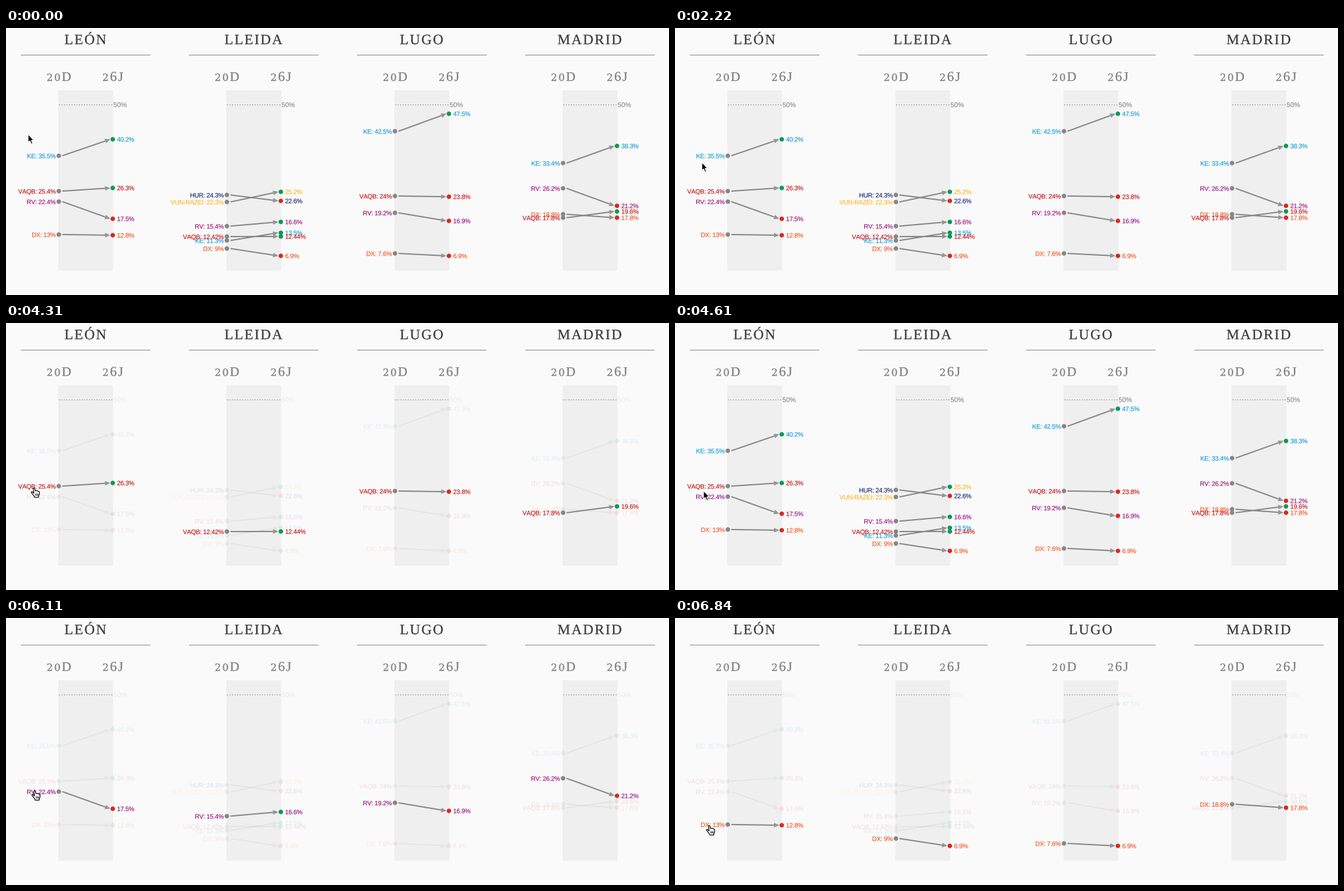
These frames come from a looping animation (1065x429 px, 8 s). A matplotlib script:

```python
import numpy as np
import matplotlib.pyplot as plt
from matplotlib.animation import FuncAnimation
from matplotlib.patches import Circle, PathPatch, Polygon, Rectangle
from matplotlib.path import Path
from matplotlib.textpath import TextPath

W, H, DPI = 1065, 429, 64
LOOP, INTERVAL = 8000, 40
PX = 72 / DPI  # one pixel in points

SANS, SERIF, WIDE = "Liberation Sans", "Liberation Serif", "DejaVu Serif"
GRAY, HEAD, GAIN, LOSS = "#868686", "#949494", "#0a9b52", "#d82a20"
COLORS = {"KE": "#0a9bdb", "VAQB": "#c60c0c", "RV": "#980a78",
          "DX": "#f1521b", "HUR": "#10206a", "VUN-RAZEI": "#fdb71e"}
PROVINCES = {
    "LEÓN": [("KE", 35.5, 40.2), ("VAQB", 25.4, 26.3),
             ("RV", 22.4, 17.5), ("DX", 13, 12.8)],
    "LLEIDA": [("VUN-RAZEI", 22.3, 25.2), ("HUR", 24.3, 22.6),
               ("RV", 15.4, 16.6), ("KE", 11.3, 13.5),
               ("VAQB", 12.42, 12.44), ("DX", 9, 6.9)],
    "LUGO": [("KE", 42.5, 47.5), ("VAQB", 24, 23.8),
             ("RV", 19.2, 16.9), ("DX", 7.6, 6.9)],
    "MADRID": [("KE", 33.4, 38.3), ("RV", 26.2, 21.2),
               ("DX", 18.8, 17.8), ("VAQB", 17.8, 19.6)],
}

# Pointer moves: start and end in ms, resting place
HOME = (35, 170)
MOVES = [(140, 880, (42, 203)), (1930, 2960, (45, 264.5)),
         (4310, 5060, (46, 277)), (6110, 6840, (55, 333))]
TICK = 147         # ms between screen refreshes while the pointer moves
REACH = 6          # px around a row in which it reacts
FADE_STEP = 0.6    # share of the fade done per refresh
FAINT = 0.1

ARROW = np.array([(0.5, 0.5), (0.5, 14), (3.4, 11.3), (5.7, 16.6), (8, 15.6),
                  (5.8, 10.5), (9.8, 10.5)])
HAND = np.array([(-1.4, 1.2), (-0.2, 0.3), (1, 1.1), (2, 5.2), (4.2, 4.8),
                 (6.4, 5.5), (8.4, 6.6), (8.8, 10), (7.6, 13), (7.3, 15.6),
                 (0.8, 15.6), (0, 13.4), (-4.5, 7.7), (-4, 6.7), (-2.6, 6.8),
                 (-0.2, 9)])

fig = plt.figure(figsize=(W / DPI, H / DPI), dpi=DPI, facecolor="#fafafa")
ax = fig.add_axes([0, 0, 1, 1])
ax.set(xlim=(0, W), ylim=(H, 0))
ax.axis("off")


def add(patch):
    patch.set_zorder(2)
    return ax.add_patch(patch)


def stroke(p, q, color, width, **style):
    return add(PathPatch(Path([p, q]), fc="none", ec=color, lw=width * PX,
                         capstyle="butt", snap=False, **style))


def dot(x, y, color):
    return add(Circle((x, y), 3.6, fc=color, ec="none"))


advances = {}


def advance(char, family):
    """Advance width of a glyph at size 1."""
    key = char, family
    if key not in advances:
        def width(s):
            return TextPath((0, 0), s, 100, prop={"family": family}).get_extents().width
        advances[key] = (width("H" + char + "H") - width("HH")) / 100
    return advances[key]


def text(x, y, glyphs, color, spacing=0, anchor=0.0, weight=0.1):
    """Draw (char, family, size) glyphs on baseline y; anchor 0 left, 1 right."""
    verts, codes, pen = [], [], 0
    for char, family, size in glyphs:
        if char != " ":
            path = TextPath((pen, 0), char, size, prop={"family": family})
            verts.append(path.vertices)
            codes.append(path.codes)
        pen += advance(char, family) * size + spacing
    verts = np.concatenate(verts) * (1, -1) + (x - (pen - spacing) * anchor, y)
    return add(PathPatch(Path(verts, np.concatenate(codes)), fc=color, ec=color,
                         lw=weight * PX, snap=False))


def plain(s, family, size):
    return [(c, family, size) for c in s]


def label(x, y, s, color, anchor=0):
    return text(x, y + 3.7, plain(s, SANS, 10.2), color, -0.25, anchor)


def level_y(v):
    return 123.7 + (50 - v) * 5.625


def slope(x, party, before, after):
    """One party's change between both votes, as a list of artists."""
    color = COLORS[party]
    y0, y1 = level_y(before), level_y(after)
    start, tip = np.array([x + 90.5, y0]), np.array([x + 167.5, y1])
    along = (tip - start) / np.hypot(*(tip - start))
    across = np.array([-along[1], along[0]]) * 3.7
    base = tip - along * 8.5
    return [
        stroke(start, base, GRAY, 2),
        add(Polygon([tip, base + across, base - across], fc=HEAD, ec="none")),
        dot(x + 84.8, y0, GRAY),
        dot(x + 171.5, y1, GAIN if after > before else LOSS),
        label(x + 80, y0 + 0.3, f"{party}: {before:g}%", color, 1),
        label(x + 178.3, y1, f"{after:g}%", color),
    ]


OLD_2, OLD_0 = ("2", WIDE, 16), ("0", WIDE, 16)
DATES = [(85, [OLD_2, OLD_0, ("D", SERIF, 21)]),
         (171.5, [OLD_2, ("6", SERIF, 22), ("J", SERIF, 21)])]

slopes, halves = [], []
for i, (province, results) in enumerate(PROVINCES.items()):
    x = 270 * i
    text(x + 127.5, 26, plain(province, SERIF, 23), "#3c3c3c", 2, 0.5, 0.3)
    stroke((x + 24, 43.5), (x + 232, 43.5), "#888888", 1)
    for cx, glyphs in DATES:
        text(x + cx, 85, glyphs, "#808080", 2, 0.5, 0.3)
    add(Rectangle((x + 84, 100), 88, 290, fc="#efefef", ec="none"))
    stroke((x + 85, 123.5), (x + 172, 123.5), "#999999", 1, ls=(0, (2, 2)))
    halves.append(text(x + 172.5, 127, plain("50%", SANS, 10.8), "#888888"))
    for party, before, after in results:
        slopes.append((party, slope(x, party, before, after)))

arrow = add(Polygon(ARROW, fc="black", ec="white", lw=1.2 * PX))
hand = add(Polygon(HAND, fc="white", ec="black", lw=1.2 * PX, joinstyle="round"))
knuckles = [stroke((0, 0), (0, 1), "black", 0.9) for _ in range(3)]


def pointer(t):
    """Pointer position, easing from rest to rest."""
    pos = np.array(HOME, float)
    for start, end, goal in MOVES:
        u = np.clip((t - start) / (end - start), 0, 1)
        pos += (goal - pos) * u * u * (3 - 2 * u)
    return pos


def refreshes():
    """Screen states as (time, pointer, hovered party, fade level)."""
    times = [0]
    for start, end, _ in MOVES:
        times += list(np.linspace(start, end, round((end - start) / TICK) + 1))
    rows = [(p, level_y(before)) for p, before, _ in PROVINCES["LEÓN"]]
    states, last, level = [], None, 0
    for t in times:
        pos = pointer(t)
        over = next((p for p, y in rows if abs(y - pos[1]) < REACH), None)
        # Fades in gradually, clears at once
        level = min(1, (level if over == last else 0) + FADE_STEP) if over else 0
        states.append((t, pos, over, level))
        last = over
    return states


STATES = refreshes()


def update(frame):
    now = (frame + 1) * INTERVAL
    _, pos, over, level = [s for s in STATES if s[0] < now][-1]

    dimmed = 1 - (1 - FAINT) * level
    for party, artists in slopes:
        for artist in artists:
            artist.set_alpha(1 if party == over else dimmed)
    for half in halves:
        half.set_alpha(dimmed)

    arrow.set_xy(ARROW + pos)
    hand.set_xy(HAND + pos)
    for k, line in enumerate(knuckles):
        kx = 2.6 + 1.8 * k
        line.set_path(Path(pos + [(kx, 9.6), (kx, 13.2)]))
    arrow.set_visible(over is None)
    for part in [hand, *knuckles]:
        part.set_visible(over is not None)
    return []


anim = FuncAnimation(fig, update, frames=LOOP // INTERVAL, interval=INTERVAL,
                     init_func=lambda: update(0), repeat=True, repeat_delay=0)
plt.show()
```
